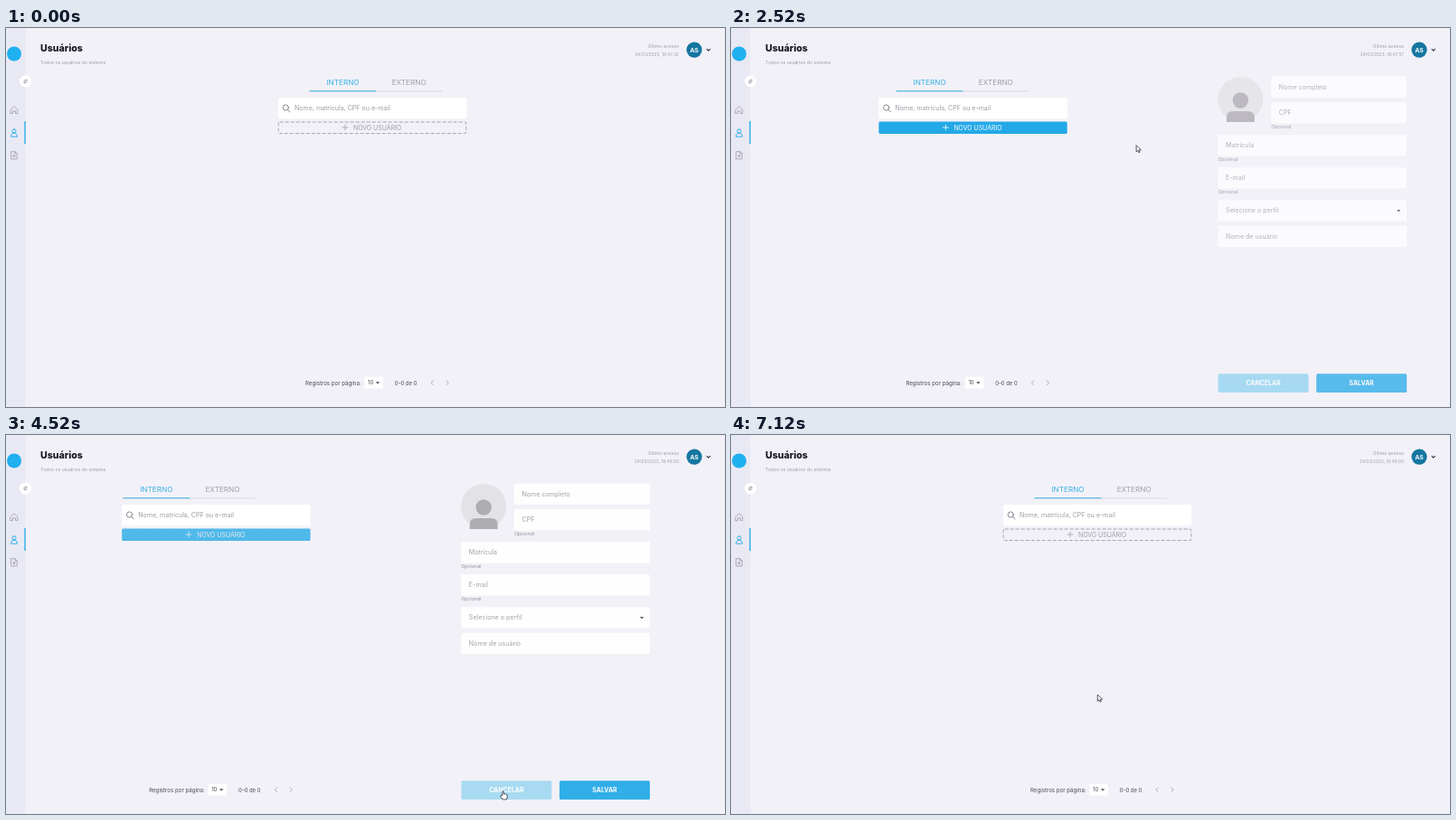
These frames come from a looping animation (795x419 px, 7.18 s). An HTML page:

```html
<!DOCTYPE html>
<html lang="pt-BR">
<head>
<meta charset="utf-8">
<title>Usuários</title>
<style>
  html, body { margin: 0; width: 100%; height: 100%; overflow: hidden; background: #f3f1f8; }
  svg { display: block; width: 795px; height: 419px; font-family: Inter, "Open Sans", sans-serif; }
  .line { fill: none; stroke-linecap: round; stroke-linejoin: round; }
</style>
</head>
<body>
<svg id="stage" viewBox="0 0 795 419"></svg>
<script>
const LOOP = 7180, OPEN = 2255, CLOSE = 4471, FOCUS = 2800, BLUR = 4290;
const SLIDE = 186, TAB_SHIFT = 34.5;
const BLUE = '#22a9e7', GREY = '#9d9ca6', DARK = '#4b4a55';
const CANCEL = '#8dd3f1', CANCEL_HOVER = '#a3d9f2';

const text = (x, y, size, str, fill = GREY, attrs = '') =>
  `<text x="${x}" y="${y}" font-size="${size}" fill="${fill}" ${attrs}>${str}</text>`;
const rect = (x, y, w, h, fill, attrs = '') =>
  `<rect x="${x}" y="${y}" width="${w}" height="${h}" rx="1.5" fill="${fill}" ${attrs}/>`;
const line = (d, stroke = GREY, width = .8, attrs = '') =>
  `<path class="line" d="${d}" stroke="${stroke}" stroke-width="${width}" ${attrs}/>`;
const field = (x, y, w, label, id = '') =>
  rect(x, y, w, 23.3, '#fff') + text(x + 8.5, y + 14, 7.1, label, GREY, id);
const optional = (x, y) => text(x, y, 5.2, 'Opcional', '#85848e', 'font-style="italic"');
const middle = 'text-anchor="middle"', end = 'text-anchor="end"', bold = 'font-weight="700"';

const sidebar = `
  <rect width="21.6" height="419" fill="#e9e9f4"/>
  <circle cx="9" cy="28.5" r="8" fill="#1fb0f0"/>
  <circle cx="21.5" cy="59" r="6.5" fill="#fff"/>
  ${line('M20 58h3.4l-1-1M23 60h-3.4l1 1', '#55545e', .6)}
  ${line('M5.2 90.3L9 86.6l3.8 3.7v4.2h-2.3v-2.7h-3v2.7H5.2z')}
  ${line('M9 111.8a2 2 0 0 1 0 4.2a2 2 0 0 1 0-4.2M5.5 119.8q0-3 2.2-3.3h2.6q2.2.3 2.2 3.3z', BLUE, .9)}
  <rect x="20.3" y="103" width="1.5" height="25" fill="#35b3e4"/>
  ${line('M6 136.7h4l2.2 2.2v6H6zM10 136.7v2.2h2.2M9 143v-3M7.7 141.5h2.6')}`;

const header = `
  ${text(38, 25.8, 10.6, 'Usuários', '#17161f', 'font-weight="800"')}
  ${text(38, 39.6, 5.15, 'Todos os usuários do sistema')}
  ${text(744, 22, 5.15, 'Último acesso', GREY, end)}
  ${text(744, 30.6, 4.75, '', GREY, end + ' id="stamp"')}
  <circle cx="761" cy="24.1" r="8.6" fill="#1577a0"/>
  ${text(761, 26.5, 6.8, 'AS', '#fff', bold + ' ' + middle)}
  ${line('M775 23.4l1.7 1.7 1.7-1.7', '#33323c', 1.1)}`;

const list = `
  <g id="tabs">
    ${line('M301.5 69.9h146', '#d2d0da', .8)}
    ${line('M301.5 69.8h73', '#3bb3e2', 1.1)}
    ${text(338, 62.5, 8.2, 'INTERNO', '#35b0e4', middle)}
    ${text(411.2, 62.5, 8.2, 'EXTERNO', GREY, middle)}
  </g>
  ${rect(301, 77, 208.3, 23.3, '#fff')}
  <circle cx="309.3" cy="88" r="3.1" class="line" stroke="#7d7c86" stroke-width=".9"/>
  ${line('M311.6 90.3l2.5 2.5', '#7d7c86', 1)}
  ${text(319, 91, 7.07, 'Nome, matrícula, CPF ou e-mail')}
  ${rect(301.2, 104, 207.6, 12.6, 'none', 'id="dashed" stroke="#98979f" stroke-width=".85" stroke-dasharray="4 2"')}
  ${rect(301, 103.5, 208.3, 13.5, BLUE, 'id="solid"')}
  <g id="newUser">
    ${line('M372 110h6M375 107v6', 'currentColor', .8)}
    ${text(384, 112.6, 6.95, 'NOVO USUÁRIO', 'currentColor')}
  </g>
  ${text(331, 394.5, 6.15, 'Registros por página:', DARK)}
  ${rect(396.5, 385.8, 20.5, 12.6, '#fff')}
  ${text(400, 394.3, 6, '10', DARK)}
  <path d="M408.8 391.2h4.4l-2.2 2.3z" fill="${DARK}"/>
  ${text(429.8, 394.5, 5.9, '0–0 de 0', DARK)}
  ${line('M472.4 389.8l-2.3 2.4 2.3 2.4M486.9 389.8l2.3 2.4-2.3 2.4', '#a5a4ad', .9)}`;

const form = `
  <circle cx="515" cy="79" r="25" fill="#e2e1e6"/>
  <circle cx="515" cy="80" r="8.7" fill="#a9a8ad"/>
  <path d="M499.5 104v-5q0-7 7-7h17q7 0 7 7v5z" fill="#a9a8ad"/>
  ${field(548.8, 53.5, 149.8, 'Nome completo', 'id="nameLabel"')}
  <g id="focus">
    ${rect(549, 53.8, 149.4, 22.6, 'none', 'stroke="#86cdea" stroke-width=".9"')}
    <rect id="caret" x="557.2" y="64.5" width=".8" height="8.5" fill="#33323c"/>
  </g>
  ${field(548.8, 82, 149.8, 'CPF')}${optional(548.8, 110.8)}
  ${field(490.2, 118.2, 208.4, 'Matrícula')}${optional(490.2, 147)}
  ${field(490.2, 154.2, 208.4, 'E-mail')}${optional(490.2, 183)}
  ${field(490.2, 190.3, 208.4, 'Selecione o perfil')}
  <path d="M687.6 201h4.4l-2.2 2.3z" fill="${DARK}"/>
  ${field(490.2, 218.8, 208.4, 'Nome de usuário')}
  ${rect(490.2, 382.3, 100, 20.8, CANCEL, 'id="cancel"')}
  ${text(540.2, 395.1, 6.95, 'CANCELAR', '#fff', bold + ' ' + middle)}
  ${rect(598.8, 382.3, 100, 20.8, BLUE)}
  ${text(648.8, 395.1, 6.95, 'SALVAR', '#fff', bold + ' ' + middle)}`;

const cursor = `
  <path id="arrow" d="M0 0v7.2l1.7-1.5 1.1 2.4 1.2-.5-1-2.3h2.3z" fill="#fff" stroke="#22212a" stroke-width=".75"/>
  <path id="hand" d="M-.7 5V.4q.7-1 1.4 0v3q.8-.6 1.4.2.8-.4 1.3.4 1-.3 1.2.8v2.4l-.8 2.3H-.4L-2.9 6q0-1.2 1.2-1z" fill="#fff" stroke="#22212a" stroke-width=".75"/>`;

document.getElementById('stage').innerHTML = `
  <clipPath id="content"><rect width="781" height="419"/></clipPath>
  ${sidebar}${header}
  <g clip-path="url(#content)"><g id="list">${list}</g><g id="form">${form}</g></g>
  <g id="cursor">${cursor}</g>`;

const el = Object.fromEntries([...document.querySelectorAll('[id]')].map(e => [e.id, e]));
const clamp = v => Math.min(1, Math.max(0, v));
const ramp = (t, start, duration) => clamp((t - start) / duration);

// CSS "ease": cubic-bezier(.25, .1, .25, 1), solved by bisection
function ease(x) {
  if (x <= 0 || x >= 1) return clamp(x);
  const bezier = (u, a, b) => 3 * u * (1 - u) * ((1 - u) * a + u * b) + u ** 3;
  let lo = 0, hi = 1;
  for (let i = 0; i < 24; i++) {
    const mid = (lo + hi) / 2;
    if (bezier(mid, .25, .25) < x) lo = mid; else hi = mid;
  }
  return bezier(lo, .1, 1);
}
const opened = (t, duration) => ease(ramp(t, OPEN, duration)) - ease(ramp(t, CLOSE, duration));

// Pointer waypoints: time, x, y
const route = [
  [880, 412, 243], [1450, 434, 140], [1820, 437, 118], [2050, 439, 110], [2280, 440, 111],
  [2520, 448, 129.5], [3030, 488, 180], [3400, 560, 290], [3700, 590, 385], [4000, 552, 393],
  [4540, 549.5, 393.5], [4800, 515, 378], [5120, 453.5, 339], [5180, 437, 329],
  [5400, 425, 305], [6000, 405.3, 287]
];
function pointer(t) {
  const next = route.findIndex(p => p[0] > t);
  if (next < 0) return route.at(-1).slice(1);
  if (next === 0) return route[0].slice(1);
  const [t0, x0, y0] = route[next - 1], [t1, x1, y1] = route[next];
  const k = (t - t0) / (t1 - t0);
  return [x0 + (x1 - x0) * k, y0 + (y1 - y0) * k];
}

function draw(t) {
  const open = opened(t, 600), filled = opened(t, 300);
  el.list.setAttribute('transform', `translate(${-SLIDE * open})`);
  el.tabs.setAttribute('transform', `translate(${TAB_SHIFT * (1 - opened(t, 1000))})`);
  el.form.setAttribute('transform', `translate(${SLIDE * (1 - open)})`);
  el.form.setAttribute('opacity', open);
  el.dashed.setAttribute('opacity', 1 - filled);
  el.solid.setAttribute('opacity', filled);
  el.newUser.style.color = `color-mix(in srgb, #fff ${filled * 100}%, ${GREY})`;
  el.stamp.textContent = '24/03/2023, 18:' + (t < OPEN ? '47:32' : t < CLOSE ? '47:57' : '48:00');

  const focus = ease(ramp(t, FOCUS, 200)) - ease(ramp(t, BLUR, 200));
  el.focus.setAttribute('opacity', focus);
  el.caret.setAttribute('opacity', +((t - FOCUS) % 1000 < 500));
  el.nameLabel.setAttribute('font-size', 7.1 - 1.75 * focus);
  el.nameLabel.setAttribute('y', 67.5 - 5.7 * focus);
  el.nameLabel.setAttribute('fill', focus > .5 ? '#4fb8e4' : GREY);

  const [x, y] = pointer(t);
  const overNew = y > 103 && y < 117;
  const overCancel = y > 382 && t < 4700;
  const pointing = overNew || overCancel;
  el.cancel.setAttribute('fill', overCancel ? CANCEL_HOVER : CANCEL);
  el.cursor.setAttribute('transform', `translate(${x} ${y})`);
  el.cursor.setAttribute('opacity', +(t >= route[0][0]));
  el.hand.setAttribute('opacity', +pointing);
  el.arrow.setAttribute('opacity', +!pointing);
}

const start = performance.now();
function tick() {
  draw((performance.now() - start) % LOOP);
  requestAnimationFrame(tick);
}
tick();
</script>
</body>
</html>
```
